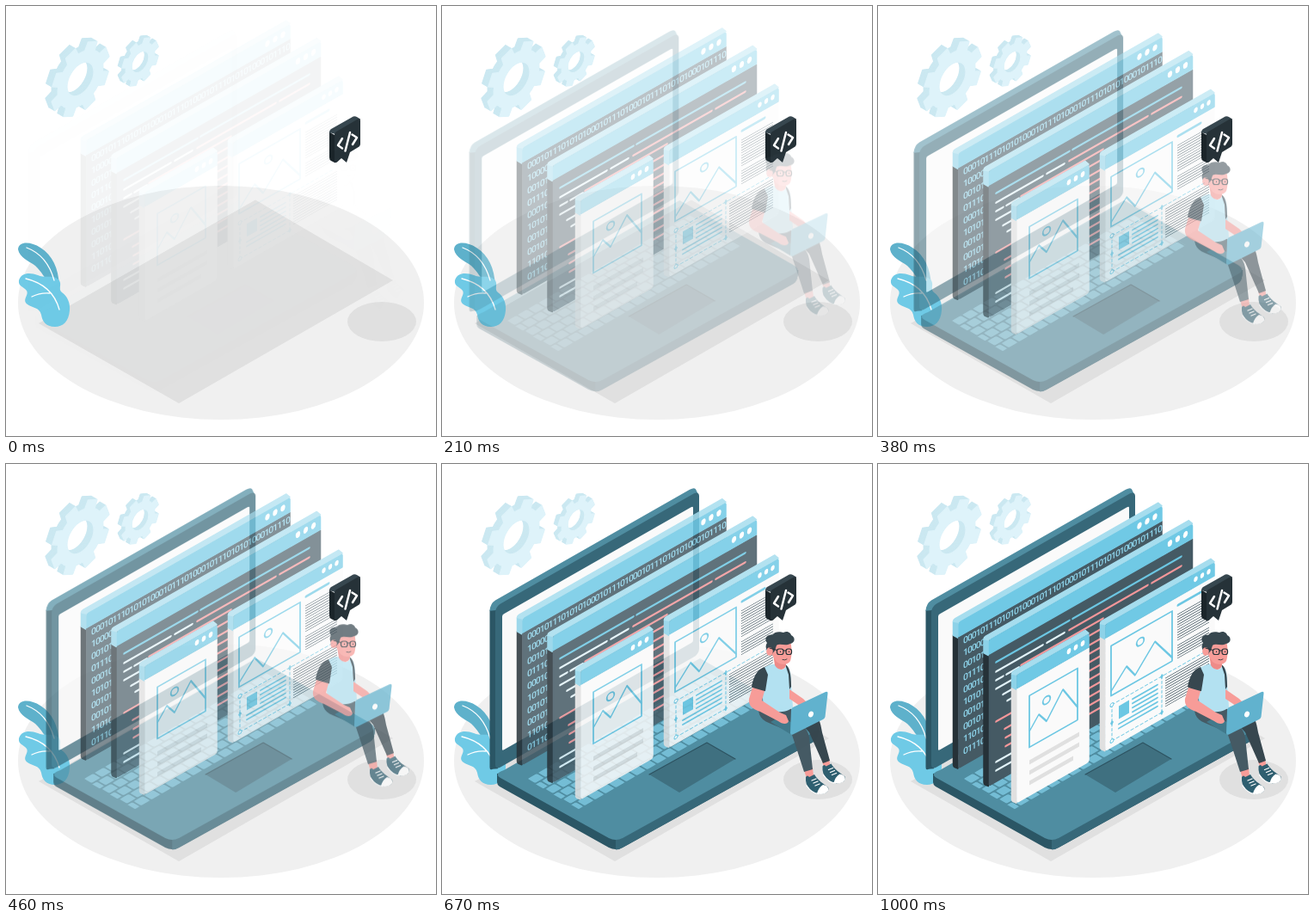
Animation of 500 by 500 pixels, one loop 1.04 s. Source, as an HTML page:

```html
<!DOCTYPE html>
<html lang="en">
<head>
<meta charset="utf-8">
<title>Web development</title>
<style>
  html, body { margin: 0; width: 100%; height: 100%; overflow: hidden; background: #fff; }
  svg { display: block; width: 100vw; height: 100vh; }
  /* --t is the progress from 0 to 1, set by the script */
  .enter {
    animation: 1s cubic-bezier(.36, -.01, .5, 1.38) calc(var(--t, .04) * -1s) both paused;
  }
  #laptop { animation-name: slide; }
  #person { animation-name: drop; }
  #windows { animation-name: drop; animation-timing-function: ease-out; }
  @keyframes slide { from { opacity: 0; transform: translateX(-30px); } to { opacity: 1; transform: none; } }
  @keyframes drop { from { opacity: 0; transform: translateY(-30px); } to { opacity: 1; transform: none; } }
  .line { fill: none; stroke-linecap: round; stroke-linejoin: round; }
  .blue { stroke: #6cc7e3; }
  .white { stroke: #e3f4fa; }
  .pink { stroke: #f4979a; }
  #digits { font: 500 10.5px Roboto, "Liberation Sans", sans-serif; letter-spacing: -1.05px; fill: #8ed5ec; }
</style>
</head>
<body>
<svg viewBox="0 0 500 500">
  <defs>
    <pattern id="keys" width="14" height="23.8" patternUnits="userSpaceOnUse">
      <g fill="#74bdd5">
        <rect x="1" y="1" width="12" height="9.8" rx="1.5"/>
        <rect x="-6" y="12.9" width="12" height="9.8" rx="1.5"/>
        <rect x="8" y="12.9" width="12" height="9.8" rx="1.5"/>
      </g>
    </pattern>
    <pattern id="copy" width="10" height="3" patternUnits="userSpaceOnUse">
      <rect width="10" height="1" fill="#5c6d76"/>
    </pattern>
  </defs>

  <ellipse cx="250" cy="345" rx="236" ry="136" fill="#f0f0f0"/>
  <path d="M38 369 290 225.500 450 319 201 462Z" fill="#e0e0e0"/>
  <ellipse cx="437" cy="367" rx="40" ry="23" fill="#e0e0e0"/>
  <g id="gears"></g>

  <g id="leaves">
    <path d="M14 283C15 273 29 274 40 281C54 290 61 304 62 326L52 322C44 317 42 309 34 302C26 296 16 293 14 283Z" fill="#5eb1cb"/>
    <path d="M15 319C18 309 29 310 37 313C46 317 54 312 61 318C66 323 60 329 65 333C71 337 75 345 74 354C73 367 66 373 57 373C46 373 42 366 41 359C39 350 30 351 25 347C18 342 27 336 24 331C20 326 14 326 15 319Z" fill="#6fcae6"/>
    <g class="line" stroke="#fff" stroke-width="1.300">
      <path d="M24 281C40 287 51 301 56 319"/>
      <path d="M23 317C44 322 57 335 62 353M30 338Q40 333 51 334"/>
    </g>
  </g>

  <g id="laptop" class="enter">
    <g transform="matrix(1 -.57 0 1 62 166)">
      <path d="M-6.500 0V183Q-6.500 187 -3 187L3 190V2Z" fill="#2b5665"/>
      <path d="M-6.500 1Q-6 -7 0 -7.400H226Q231 -7.400 233 -4L236 4 4 6Z" fill="#4f8da1"/>
      <rect width="237" height="190" rx="6" fill="#376879"/>
      <rect x="8" y="14" width="222" height="158" rx="2" fill="#fafafa"/>
    </g>
    <path d="M64 360V370Q64 373 67 375L194 446Q202 450 210 446L432 323Q438 320 438 307Z" fill="#2b5665"/>
    <path d="M202 436V448.500Q206 448.500 210 446L432 323Q438 320 438 307Z" fill="#376879"/>
    <path d="M72 356 300 226 432 301Q442 307 432 312L210 435Q202 439 194 435L68 365Q60 360 72 356Z" fill="#4f8da1"/>
    <rect width="246" height="71.400" fill="url(#keys)" transform="matrix(.866 -.5 .866 .5 98 366)"/>
    <path d="M241 361 308 324 341 343 276 382Z" fill="#3f7080"/>
    <path d="M241 361 308 324 341 343" class="line" stroke="#2d5361" stroke-width="1.200"/>
  </g>

  <g id="windows" class="enter">
    <g id="binary" transform="matrix(1 -.57 0 1 93 184)">
      <g id="digits"></g>
    </g>
    <g id="code" transform="matrix(1 -.57 0 1 128.500 204.500)">
      <g class="line" stroke-width="2.500">
        <path class="blue" d="M9 31h85M98 31h126"/>
        <path class="white" d="M9 42h54M68 42h20M9 52h8M21 52h14M9 62h19M17 73h11M22 83h8M9 147h20M9 157h20"/>
        <path class="pink" d="M94 42h91M190 42h34M38 51h95M40 62h95M110 73h25M110 83h25M110 93h25M110 103h25M110 113h25M110 123h25M110 133h25M110 143h25M110 153h25M9 100h20M19 114h10M20 125h10M20 135h10"/>
      </g>
    </g>
    <g id="page" transform="matrix(1 -.57 0 1 264 186.500)">
      <g class="line blue" stroke-width="1.800">
        <rect x="7" y="29" width="71" height="58"/>
        <path d="M7 82 25 63 35 79 58 53 78 83"/>
        <circle cx="41" cy="43.500" r="4.300"/>
      </g>
      <path class="line blue" stroke-width="3" d="M85 26h26"/>
      <g fill="url(#copy)">
        <rect x="84" y="36" width="37" height="16"/>
        <rect x="84" y="54" width="37" height="13"/>
        <rect x="84" y="72" width="37" height="16"/>
        <rect x="70" y="102" width="51" height="16"/>
        <rect x="70" y="120" width="51" height="16"/>
      </g>
      <g class="line blue" stroke-width="1">
        <path d="M8 98H116M8 140H66M8 98V140M66 98V140" stroke-dasharray="3 2.500"/>
        <circle cx="8" cy="98" r="2" fill="#fff"/>
        <circle cx="8" cy="140" r="2" fill="#fff"/>
      </g>
      <path d="M66 95l2 3-2 3-2-3zM66 137l2 3-2 3-2-3zM8 116l2 3-2 3-2-3z" fill="#6cc7e3"/>
      <rect x="16" y="104" width="12" height="15" fill="#6cc7e3"/>
      <path class="line blue" stroke-width="1.800" d="M32 105h29M32 110h29M32 115h29M32 120h29M16 125h45M16 130h45"/>
    </g>
    <g id="card" transform="matrix(1 -.57 0 1 161 245)">
      <g class="line blue" stroke-width="1.800">
        <rect x="15" y="33" width="56" height="60"/>
        <path d="M15.500 74 26 61 35 74 54 48 71 78"/>
        <circle cx="35" cy="49.500" r="4.300"/>
      </g>
      <path d="M15 108h58v5h-58zM15 120h58v5h-58zM15 132h51v5h-51z" fill="#e0e0e0"/>
    </g>
  </g>

  <g id="bubble">
    <path d="M382 150 376 146.500V176Q376 179 378 180L383 182.500Z" fill="#1b252a"/>
    <path d="M376 147Q376 144 379 142.500L402 129.500Q405 127.500 408 129L412 131.500 383 149Z" fill="#37474f"/>
    <path d="M382 150Q382 147 385 145.500L409 131.500Q412 130 412 133V160Q412 163 409 164.500L400 170 396 182 390 177 385 181.500Q382 183 382 180Z" fill="#263238"/>
    <path class="line" stroke="#fff" stroke-width="2.500" d="M391 154 386 162 391 165.500M400 147 394.500 168.500M402.500 149.500 408 153 403 161"/>
  </g>

  <g id="person" class="enter">
    <path d="M442 346 450 343 452 353 445 355ZM421 356 431 353 432 363 424 366Z" fill="#f79c98"/>
    <g id="shoe">
      <path d="M423 364Q425 361 427 364L433 361C437 368 444 372 449 376C451 381 445 384 438 384C430 382 422 376 423 364Z" fill="#2f5f70"/>
      <path d="M443 373C448 374 450 377 449 380C446 384 440 385 436 383Q438 376 443 373Z" fill="#fff"/>
      <path class="line" stroke="#fff" stroke-width="1.300" d="M424 374Q430 383 438 383.500M430 368l5-2M432 371l5-2M434 374l5-2"/>
    </g>
    <use href="#shoe" x="19.500" y="-12.500"/>
    <path d="M402 284 430 290C438 292 440 300 442 312L451 345 443 348 427 312Z" fill="#37474f"/>
    <path d="M369 275C366 288 369 297 380 301L406 312 412 330 421 358 431 355 427 318C425 305 412 297 405 284Z" fill="#455a64"/>
    <path d="M374 237C380 233 386 232 388 233 391 241 399 241 400 234 405 237 406 245 406 255L408 283C398 291 382 289 374 284 372 265 372 250 374 237Z" fill="#b3e1f1"/>
    <path d="M375 236C366 239 362 248 360 259Q367 265 376 264L379 245ZM399 233C404 236 406 243 406 259L404 262 403 245Z" fill="#37474f"/>
    <path d="M382 300 393 294 410 302 405 314Z" fill="#41798b"/>
    <path d="M361 260 357 273C356 281 361 285 370 288L391 299C396 303 402 303 403 299L400 292 393 289 372 275 375 264ZM404 262 420 273 425 278 416 281 404 273Z" fill="#f79c98"/>
    <path d="M406 286Q406 284 408 283L446 265Q449 264 448.500 267L445.500 294Q445 296 443 297L408 314.500Q405 315.500 405 312.500Z" fill="#61b2ce"/>
    <ellipse cx="429" cy="291" rx="2.800" ry="3.600" transform="rotate(25 429 291)" fill="#fff"/>
    <path d="M385 221 387 234C391 241 399 240 400 234L400 228Z" fill="#ee8b88"/>
    <path d="M383 208C390 204 400 209 405 206 407 213 407 223 405 229 402 234 394 234 389 230L384 222Z" fill="#f79c98"/>
    <path d="M378 208C374 203 378 198 384 199 387 194 394 195 397 196 402 193 406 197 406 199 411 201 411 208 405 209 399 212 393 208 389 211L387 217 383 222 379 218C376 214 376 211 378 208Z" fill="#37474f"/>
    <ellipse cx="381" cy="218" rx="3.800" ry="4.800" fill="#f79c98"/>
    <g class="line" stroke="#263238" stroke-width="1.200">
      <rect x="389.500" y="215" width="7.500" height="6.500" rx="2.500"/>
      <rect x="400" y="215" width="6.500" height="6.500" rx="2.500"/>
      <path d="M381 214 389.500 216.500M397 217h3M393.500 218v.500M403.500 218v.500"/>
      <path d="M396 227.500q3 1 5-.500" stroke-width=".800"/>
    </g>
  </g>
</svg>

<script>
  const add = (id, svg, where = 'afterbegin') => document.getElementById(id).insertAdjacentHTML(where, svg);

  // Stacks copies of a shape from back to front to give it thickness.
  const extrude = (shape, depth, side, steps = 10) =>
    Array.from({ length: steps }, (_, i) => {
      const d = -depth * (1 - i / steps);
      return `<g transform="translate(${d} ${d})" fill="${side}" stroke="${side}">${shape}</g>`;
    }).join('');

  function gear(cx, cy, r, hole, depth, phase) {
    const tooth = [[-22.5, .76], [-14, .76], [-10, .98], [10, .98], [14, .76]];
    const points = [];
    for (let k = 0; k < 8; k++) {
      for (const [turn, size] of tooth) {
        const a = (k * 45 + phase + turn) * Math.PI / 180;
        points.push(`${(Math.cos(a) * r * size).toFixed(2)} ${(Math.sin(a) * r * size).toFixed(2)}`);
      }
    }
    const shape = `<path fill-rule="evenodd" d="M${points.join('L')}ZM${hole} 0A${hole} ${hole} 0 1 0 ${-hole} 0A${hole} ${hole} 0 1 0 ${hole} 0Z"/>`;
    add('gears', `<g transform="matrix(.866 -.5 0 1 ${cx} ${cy})" stroke-width="1.5" stroke-linejoin="round">
      ${extrude(shape, depth, '#cbe8f1')}
      <g fill="#def3fa" stroke="#def3fa">${shape}</g></g>`, 'beforeend');
  }

  // Frame of a browser window in its own slanted plane.
  function frame(id, w, h, head, gap, face, side) {
    const dx = 5.5, dy = 6.3;
    const solid = (d, color) => `<path d="${d}" fill="${color}" stroke="${color}"/>`;
    const dots = [3, 2, 1].map(i =>
      `<ellipse cx="${w - gap * i}" cy="${head * .44}" rx="${gap * .3}" ry="${gap * .4}" fill="#fff"/>`).join('');
    add(id, `<g stroke-width="1.5" stroke-linejoin="round">
      ${solid(`M0 ${head}L${-dx} ${head - dy}V${h - dy - 3}Q${-dx} ${h - dy} -3 ${h - 4}L0 ${h - 1}Z`, side)}
      ${solid(`M0 0L${-dx} ${2 - dy}V${head - dy}L0 ${head}Z`, '#8dd2e8')}
      ${solid(`M0 0H${w - 1}L${w - dx} ${-dy}H${2 - dx}Q${-dx} ${-dy} ${-dx} ${2 - dy}Z`, '#a6ddee')}
      ${solid(`M1 ${head}H${w - 1}V${h - 3}Q${w - 1} ${h - 1} ${w - 3} ${h - 1}H3Q1 ${h - 1} 1 ${h - 3}Z`, face)}
      ${solid(`M1 3Q1 1 3 1H${w - 3}Q${w - 1} 1 ${w - 1} 3V${head - 1}H1Z`, '#70c9e5')}
      </g>${dots}`);
  }

  gear(86.5, 85, 40, 18, 8.1, 25);
  gear(156, 65, 25.5, 11.5, 5.2, 22.5);

  frame('binary', 238, 171, 18, 9, '#455a64', '#263238');
  frame('code', 238, 171, 18, 9, '#455a64', '#263238');
  frame('page', 128, 148, 17, 7.5, '#fafafa', '#e0e0e0');
  frame('card', 85, 150, 17, 8, '#fafafa', '#e0e0e0');

  const rows = '00010111010101000101110100010111010101000101110 100001 001011 011101 000101 101010 001011 001010 110100 011101';
  add('digits', rows.split(' ').map((row, i) =>
    `<text x="6" y="${29 + i * 14.3}">${row}</text>`).join(''));

  const LOOP = 1040, FPS = 24, COUNT = 25;
  const start = performance.now();
  function tick() {
    const ms = (performance.now() - start) % LOOP;
    const step = Math.min(COUNT - 1, Math.floor((ms + 5) * FPS / 1000));
    document.documentElement.style.setProperty('--t', (step + 1) / COUNT);
    requestAnimationFrame(tick);
  }
  tick();
</script>
</body>
</html>
```
